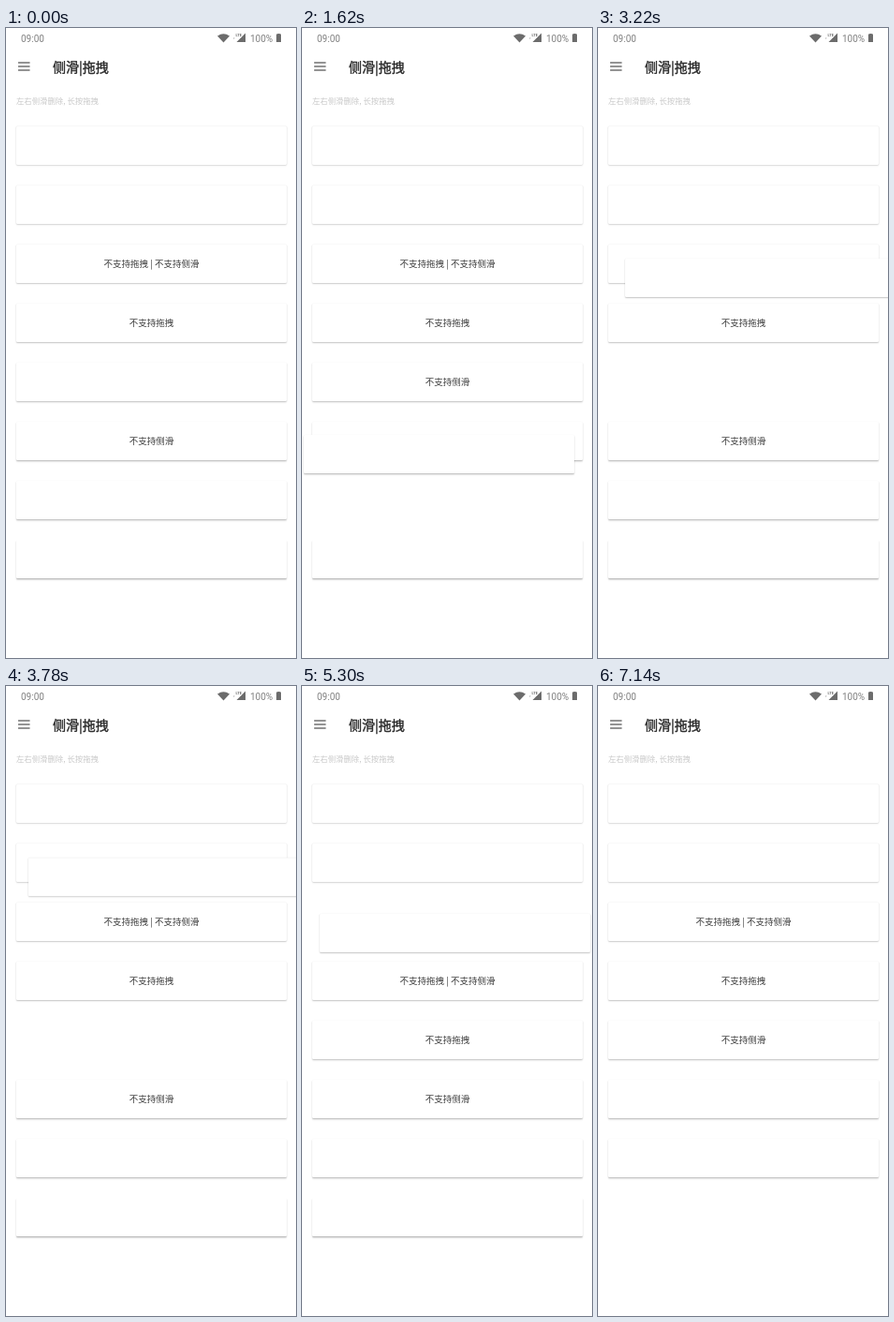
An HTML page that plays this animation: 310 by 672 pixels, repeating every 8 s.

```html
<!DOCTYPE html>
<html lang="zh-CN">
<head>
<meta charset="utf-8">
<style>
  html, body { margin: 0; width: 100%; height: 100%; overflow: hidden; background: #fff; }
  #stage { position: relative; width: 310px; height: 672px; overflow: hidden; background: #fff;
    font-family: "Noto Sans CJK SC", "Noto Sans CJK", sans-serif; }
  #stage > * { position: absolute; }
  svg { left: 0; top: 0; }
  .status { font: 10px/12px Roboto, sans-serif; color: #808080; top: 6px; }
  .title { left: 50px; top: 31px; font-size: 14px; line-height: 20px; color: #2a2a2a;
    -webkit-text-stroke: .4px #2a2a2a; white-space: nowrap; }
  .hint { left: 11px; top: 71px; font-size: 8.4px; line-height: 12px; color: #c9c9c9; white-space: nowrap; }
  .card { left: 1px; top: 0; width: 289px; height: 41px; border-radius: 1px; background: #fff;
    font-size: 9.5px; font-weight: 300; line-height: 40px; color: #3c3c3c;
    text-align: center; white-space: nowrap; }
</style>
</head>
<body>
<div id="stage">
  <div class="status" style="left:16px">09:00</div>
  <div class="status" style="left:261px">100%</div>
  <svg width="310" height="60" viewBox="0 0 310 60" fill="#6c6c6c">
    <path d="M226 8.600Q232.500 3.900 239 8.600L232.500 15.500Z"/>
    <path d="M256 5.500V15H246.500Z"/>
    <path d="M242.500 5.500H252V10H242.500Z" fill="#fff"/>
    <text x="245.500" y="9.300" font-family="Roboto, sans-serif" font-size="4" font-weight="700">LTE</text>
    <path d="M243 10.500h1.500l-.75 1.500Z" fill="#999"/>
    <path d="M290.300 6.500V6H292.700V6.500H294V15H289V6.500Z"/>
    <path d="M13 37.500H25.500M13 41.500H25.500M13 45.500H25.500" transform="translate(0 -.5)"
      stroke="#2a2a2a" stroke-width="1.2"/>
  </svg>
  <div class="title">侧滑|拖拽</div>
  <div class="hint">左右侧滑删除, 长按拖拽</div>
</div>
<script>
const LOOP = 8000, TICK = 80, PHASE = 20;
const LEFT = 10, TOP = 105, PITCH = 63, SHIFT_MS = 250;
const LABELS = ['', '', '不支持拖拽 | 不支持侧滑', '不支持拖拽', '', '不支持侧滑', '', ''];
const DRAGGED = 4, SWIPED = 1, SWIPE_AT = 6340, SWIPE_MS = 320;

// time, x, y where the finger turns or changes pace
const DRAG = [
  [660, 10, 357], [1300, 0, 486], [1620, 1, 434], [2420, 25, 251], [2900, 21, 275],
  [3220, 28, 246], [4180, 20, 140], [4340, 20, 134], [5060, 20, 260], [5300, 18, 243],
  [5700, 10, 231]
];

// cards making way: time, slots moved, first and last card
const MOVES = [
  [980, -1, 5, 5], [1240, -1, 6, 6], [1685, 1, 6, 6], [1890, 1, 5, 5],
  [3980, 1, 1, 3], [4780, -1, 1, 1], [6860, -1, 2, 7]
];

const clamp = k => Math.min(1, Math.max(0, k));
const ease = k => .5 - Math.cos(Math.PI * clamp(k)) / 2;

// slope at a key point, flat at turns and ends
function slope(path, i, n) {
  const a = path[i - 1], b = path[i], c = path[i + 1];
  if (!a || !c || (b[n] - a[n]) * (c[n] - b[n]) <= 0) return 0;
  return (c[n] - a[n]) / (c[0] - a[0]);
}

// smooth curve through coordinate n of the key points
function along(path, t, n) {
  const next = path.findIndex(p => p[0] > t);
  if (next === 0) return path[0][n];
  if (next < 0) return path[path.length - 1][n];
  const i = next - 1, a = path[i], b = path[next];
  const span = b[0] - a[0], k = (t - a[0]) / span, s = 1 - k;
  return a[n] + (b[n] - a[n]) * k * k * (3 - 2 * k)
    + span * k * s * (s * slope(path, i, n) - k * slope(path, next, n));
}

const stage = document.getElementById('stage');
const cards = LABELS.map((label, i) => {
  const el = document.createElement('div');
  el.className = 'card';
  el.textContent = label;
  if (i === DRAGGED) el.style.zIndex = 1;
  stage.append(el);
  return el;
});

function place(el, i, t) {
  let x = LEFT, y = TOP + PITCH * i;
  if (i === DRAGGED) {
    x = along(DRAG, t, 1);
    y = along(DRAG, t, 2);
  }
  if (i === SWIPED) x += 320 * clamp((t - SWIPE_AT) / SWIPE_MS) ** 1.5;
  for (const [at, slots, first, last] of MOVES) {
    if (i >= first && i <= last) y += PITCH * slots * ease((t - at) / SHIFT_MS);
  }
  // shadows fall further the lower a card lies
  const drop = .5 + (y - TOP) / 441 * 1.3;
  el.style.transform = `translate(${x}px, ${y}px)`;
  el.style.boxShadow =
    `0 ${(drop / 2).toFixed(2)}px 1px rgba(0,0,0,.15), 0 ${drop.toFixed(2)}px 2px rgba(0,0,0,.16)`;
}

function draw(now) {
  const t = Math.floor((now % LOOP - PHASE) / TICK) * TICK + PHASE;
  cards.forEach((el, i) => place(el, i, t));
  requestAnimationFrame(draw);
}
draw(performance.now());
</script>
</body>
</html>
```
